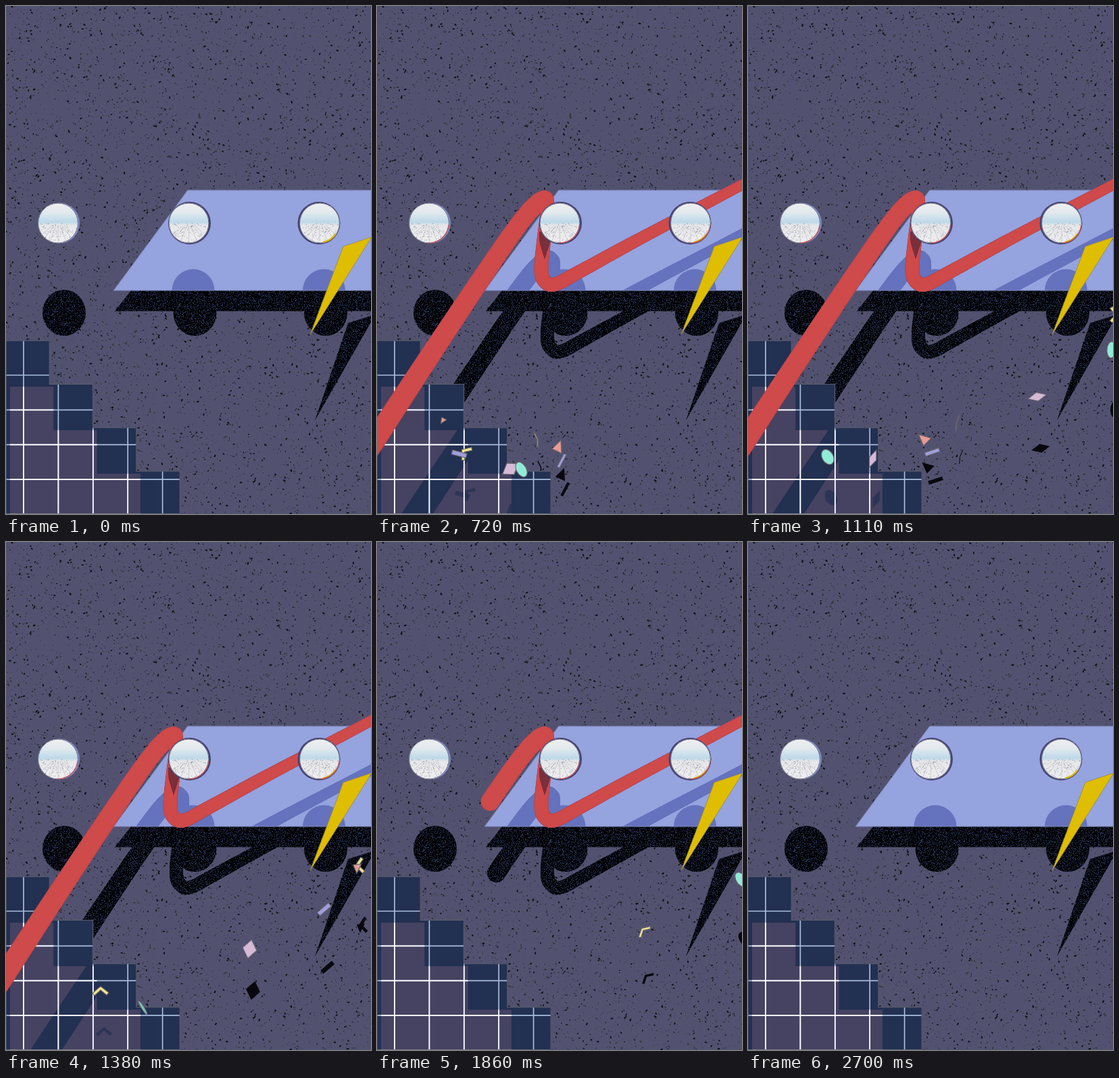
An HTML page with a canvas that plays this animation: 540 by 750 pixels, repeating every 2.73 s.

```html
<!DOCTYPE html>
<html lang="en">
<head>
<meta charset="utf-8">
<title>Ribbon and confetti</title>
<style>
html, body { margin: 0; width: 100%; height: 100%; overflow: hidden; background: #525270; }
canvas { display: block; width: 540px; height: 750px; }
</style>
</head>
<body>
<canvas id="stage" width="540" height="750"></canvas>
<script>
const W = 540, H = 750, LOOP = 2730, STEP = 30, TAU = Math.PI * 2;
const ctx = document.getElementById('stage').getContext('2d');
const NAVY = '#223051', RED = '#cf4a4a', PANEL_SHADE = '#6572bd';

const clamp = (v, lo, hi) => Math.max(lo, Math.min(hi, v));

function random(seed) {
  return () => {
    seed = (seed * 1664525 + 1013904223) >>> 0;
    return seed / 4294967296;
  };
}

function layer(paint) {
  const c = document.createElement('canvas');
  c.width = W;
  c.height = H;
  paint(c.getContext('2d'));
  return c;
}

function polygon(...points) {
  const p = new Path2D();
  points.forEach(([x, y]) => p.lineTo(x, y));
  p.closePath();
  return p;
}

function disc(x, y, rx, ry = rx) {
  const p = new Path2D();
  p.ellipse(x, y, rx, ry, 0, 0, TAU);
  return p;
}

function clipped(path, draw) {
  ctx.save();
  ctx.clip(path);
  draw();
  ctx.restore();
}

function fill(style, ...paths) {
  ctx.fillStyle = style;
  paths.forEach(p => ctx.fill(p));
}

function staircase(left, top, steps) {
  const size = 64.3, pts = [[left, H]];
  for (let i = 0; i < steps; i++) {
    pts.push([left + size * i, top + size * i], [left + size * (i + 1), top + size * i]);
  }
  return polygon(...pts, [left + size * steps, H]);
}

const stairs = staircase(0, 494, 4);
const stairsFace = staircase(6, 562, 3);
const panel = polygon([268.5, 272], [541, 272], [541, 420], [159.5, 420]);
const panelShadow = polygon([185, 420], [541, 420], [541, 450.5], [161, 450.5]);
const bolt = polygon([499, 355], [541, 341], [450, 485]);
const boltShadow = polygon([506, 468], [541, 457], [541, 465], [457, 612]);
const balls = [0, 1, 2].map(i => 77 + 193.5 * i);
const ballShadows = balls.map(x => disc(x + 9, 453, 32, 34));

// Speckled ground, and the finer grain of areas in shadow
const ground = layer(g => {
  const rnd = random(71);
  g.fillStyle = '#525270';
  g.fillRect(0, 0, W, H);
  for (let i = 0; i < 7500; i++) {
    const x = rnd() * W, y = rnd() * H, size = 0.6 + 1.5 * rnd() ** 3;
    g.fillStyle = rnd() < 0.6 ? '#0e0e12' : '#35383c';
    g.beginPath();
    g.ellipse(x, y, size, size * 0.55, rnd() * 3, 0, TAU);
    g.fill();
  }
});
const darkGrain = ctx.createPattern(layer(g => {
  const rnd = random(19);
  g.fillStyle = '#020204';
  g.fillRect(0, 0, W, H);
  for (let i = 0; i < 120000; i++) {
    g.fillStyle = rnd() < 0.5 ? '#2b365c' : '#1a2138';
    g.fillRect(rnd() * W | 0, rnd() * H | 0, 1, 1);
  }
}), 'no-repeat');

// Ribbon: up to a tip, down behind the middle ball, off to the right
const knots = [
  [-45, 705], [0, 636], [80, 514], [160, 394], [205, 329], [232, 296], [249, 286],
  [252, 302], [247, 345], [243, 386], [247, 405], [263, 411], [300, 392], [390, 343], [540, 264], [585, 240]
];
const TIP = 6;

function spline(a, b, c, d, u) {
  return b.map((v, k) => v + 0.5 * u * (c[k] - a[k] +
    u * (2 * a[k] - 5 * v + 4 * c[k] - d[k] + u * (3 * (v - c[k]) + d[k] - a[k]))));
}

const ribbon = [];
knots.slice(1).forEach((_, i) => {
  const [a, b, c, d] = [-1, 0, 1, 2].map(k => knots[clamp(i + k, 0, knots.length - 1)]);
  for (let j = 0; j < 24; j++) {
    const [x, y] = spline(a, b, c, d, j / 24);
    const last = ribbon[ribbon.length - 1];
    const len = last ? last.len + Math.hypot(x - last.x, y - last.y) : 0;
    const back = i >= TIP;
    const w = back ? 20 - 5 * clamp((x - 250) / 290, 0, 1) : 31 - 5 * clamp(x / 230, 0, 1);
    ribbon.push({ x, y, w, len, back });
  }
});
const entry = ribbon.find(p => p.x >= -10).len;
const headAt = t => entry + 1.45 * (t - 85);
const tailAt = t => entry + 1.24 * (t - 1604);
const shown = (p, t) => p.len <= headAt(t) && p.len >= tailAt(t);

function drawRibbon(t, style, shift = () => [0, 0], extra = 0) {
  ctx.strokeStyle = style;
  ctx.lineCap = 'round';
  for (let i = ribbon.length - 1; i > 0; i--) {
    const a = ribbon[i - 1], b = ribbon[i];
    if (!shown(b, t)) continue;
    const [dx, dy] = shift(b);
    ctx.lineWidth = b.w + extra;
    ctx.beginPath();
    ctx.moveTo(a.x + dx, a.y + dy);
    ctx.lineTo(b.x + dx, b.y + dy);
    ctx.stroke();
  }
}

const onGround = p => [9, p.back ? 99 : 106];
const onPanel = p => p.back ? [9, clamp(139 - p.x * 0.2, 68, 88)] : [6, 88];
const onStairs = () => [9, 191];

// Confetti: dropped behind the ribbon, then swept up and away to the right
const shapes = {
  chevron: ['#efe58d', polygon([-12, 5], [0, -6], [12, 4], [9, 8], [0, 0], [-9, 9])],
  bar: ['#9f9edb', polygon([-11, -4], [11, -4], [11, 4], [-11, 4])],
  triangle: ['#e79b92', polygon([-8, 5], [3, -11], [7, 10])],
  diamond: ['#d5b9d5', polygon([-14, 0], [0, -14], [14, 0], [0, 14])],
  oval: ['#91ead6', disc(0, 0, 12, 9)]
};
const kinds = Object.keys(shapes);
const COUNT = 11;
const rnd = random(8);
const pieces = Array.from({ length: COUNT }, (_, i) => ({
  kind: kinds[i % kinds.length],
  launch: 230 + 880 * (i / (COUNT - 1)) ** 2,
  x: 92 + 30 * rnd(),
  y: 570 + 40 * rnd(),
  pace: 0.85 + 0.3 * rnd(),
  turn: 120 * (rnd() - 0.5),
  spin: 0.2 * (rnd() - 0.5),
  flip: TAU * rnd()
}));

function poseOf(piece, t) {
  const age = t - piece.launch, s = age * piece.pace;
  const x = piece.x + 6.5e-4 * s * s;
  if (age < 0 || x > W + 20) return null;
  return {
    x,
    y: piece.y + 0.518 * s - 7.94e-4 * s * s,
    angle: piece.turn + piece.spin * age,
    flat: 0.12 + 0.8 * Math.abs(Math.sin(piece.flip + age / 210)),
    grow: Math.min(1, age / 90)
  };
}

function drawPiece(kind, pose, shade, dx = 0, dy = 0) {
  const [colour, outline] = shapes[kind];
  const shape = new Path2D();
  shape.addPath(outline, new DOMMatrix()
    .translate(pose.x + dx, pose.y + dy)
    .rotate(pose.angle)
    .scale(pose.grow, pose.flat * pose.grow));
  fill(shade || colour, shape);
  if (shade) return;
  fill(`rgba(40,40,50,${clamp(0.4 - pose.flat, 0, 0.3)})`, shape);
  ctx.strokeStyle = '#66636c';
  ctx.lineWidth = 1.1;
  ctx.stroke(shape);
}

function drawStairs(t, live) {
  fill(NAVY, stairs);
  fill('#464261', stairsFace);
  clipped(stairsFace, () => {
    drawRibbon(t, NAVY, onStairs, 9);
    live.forEach(([kind, pose]) => drawPiece(kind, pose, 'rgba(34,48,81,.7)', 5, 60));
  });
  const grid = new Path2D();
  for (let i = 0; i < 5; i++) {
    const x = 26 + 51.4 * i, y = 545 + 51.3 * i;
    grid.moveTo(x, 490);
    grid.lineTo(x, H);
    grid.moveTo(0, y);
    grid.lineTo(260, y);
  }
  ctx.lineWidth = 1.7;
  [['#a9bddc', stairs], ['#fff', stairsFace]].forEach(([colour, area]) => {
    ctx.strokeStyle = colour;
    clipped(area, () => ctx.stroke(grid));
  });
  ctx.strokeStyle = '#55586a';
  ctx.lineWidth = 1.3;
  ctx.stroke(stairs);
}

function drawPanel(t) {
  fill('#95a3de', panel);
  clipped(panel, () => {
    fill(PANEL_SHADE, ...balls.slice(1).map(x => disc(x + 6.5, 420, 31.5)));
    drawRibbon(t, PANEL_SHADE, onPanel);
  });
  ctx.strokeStyle = '#7f87b4';
  ctx.lineWidth = 1;
  ctx.stroke(panel);
}

function drawBall(x, index, t) {
  const y = 320.5, r = 29.8;
  fill(index ? '#454373' : '#7d86c5', disc(x + [2, 1, -1][index], y, index ? 31.5 : 30));
  clipped(disc(x, y, r), () => {
    const sky = ctx.createLinearGradient(0, y - r, 0, y + r);
    ['#efeff0', '#e2e9ee', '#bdd9e8', '#e4e6e8', '#eaeaec', '#efeff0']
      .forEach((c, i) => sky.addColorStop(i < 3 ? i * 0.24 : 0.55 + (i - 3) * 0.22, c));
    ctx.fillStyle = sky;
    ctx.fillRect(x - r, y - r, 2 * r, 2 * r);
    ctx.strokeStyle = 'rgba(105,105,120,.35)';
    ctx.lineWidth = 0.7;
    ctx.beginPath();
    for (let i = -3; i <= 3; i++) {
      ctx.moveTo(x + i * 3, y + 4);
      ctx.lineTo(x + i * 13, y + r);
    }
    ctx.stroke();
    const grain = random(90 + index);
    ctx.fillStyle = '#6d6f80';
    for (let i = 0; i < 65; i++) {
      const a = grain() * TAU, d = r * Math.sqrt(grain());
      ctx.fillRect(x + d * Math.cos(a), y + Math.abs(d * Math.sin(a)), 1, 0.7);
    }
  });
  const rim = (colour, from, to, width) => {
    ctx.strokeStyle = colour;
    ctx.lineWidth = width;
    ctx.lineCap = 'butt';
    ctx.beginPath();
    ctx.arc(x, y, r - width / 2, from, to);
    ctx.stroke();
  };
  rim('#55536b', 0, TAU, 0.8);
  if (index === 2) rim('#d9b800', 0.6, 1.4, 2.5);
  const mirrored = ribbon.find(p => p.x >= x + 25);
  if (shown(mirrored, t)) rim('#c65055', 0.1, 1.6, 1.3);
}

const underBall = polygon([240, 333], [259, 338], [254, 355], [248, 373], [241, 350]);

function drawRibbonFront(t) {
  drawRibbon(t, '#b04550', undefined, 0.8);
  drawRibbon(t, RED, undefined, -0.8);
  const behind = ribbon.find(p => p.back && p.y > 345);
  if (shown(behind, t)) clipped(underBall, () => {
    ctx.globalAlpha = 0.6;
    drawRibbon(Math.min(t, 520), '#7a2f3b', undefined, -1);
  });
}

function render(t) {
  const live = pieces.map(p => [p.kind, poseOf(p, t)]).filter(([, pose]) => pose);
  ctx.drawImage(ground, 0, 0);

  fill(darkGrain, panelShadow, boltShadow, ...ballShadows);
  drawRibbon(t, darkGrain, onGround);
  live.forEach(([kind, pose]) => {
    drawPiece(kind, pose, '#08080e', 5, clamp(pose.x * 0.22 - 18, 41, 88));
  });

  drawStairs(t, live);
  drawPanel(t);
  drawRibbonFront(t);
  balls.forEach((x, i) => drawBall(x, i, t));

  fill('#dfbd00', bolt);
  ctx.strokeStyle = '#98884a';
  ctx.lineWidth = 0.8;
  ctx.stroke(bolt);
  live.forEach(([kind, pose]) => drawPiece(kind, pose));
}

function tick() {
  const t = performance.now() % LOOP;
  render(Math.floor(t / STEP) * STEP);
  requestAnimationFrame(tick);
}
tick();
</script>
</body>
</html>
```
